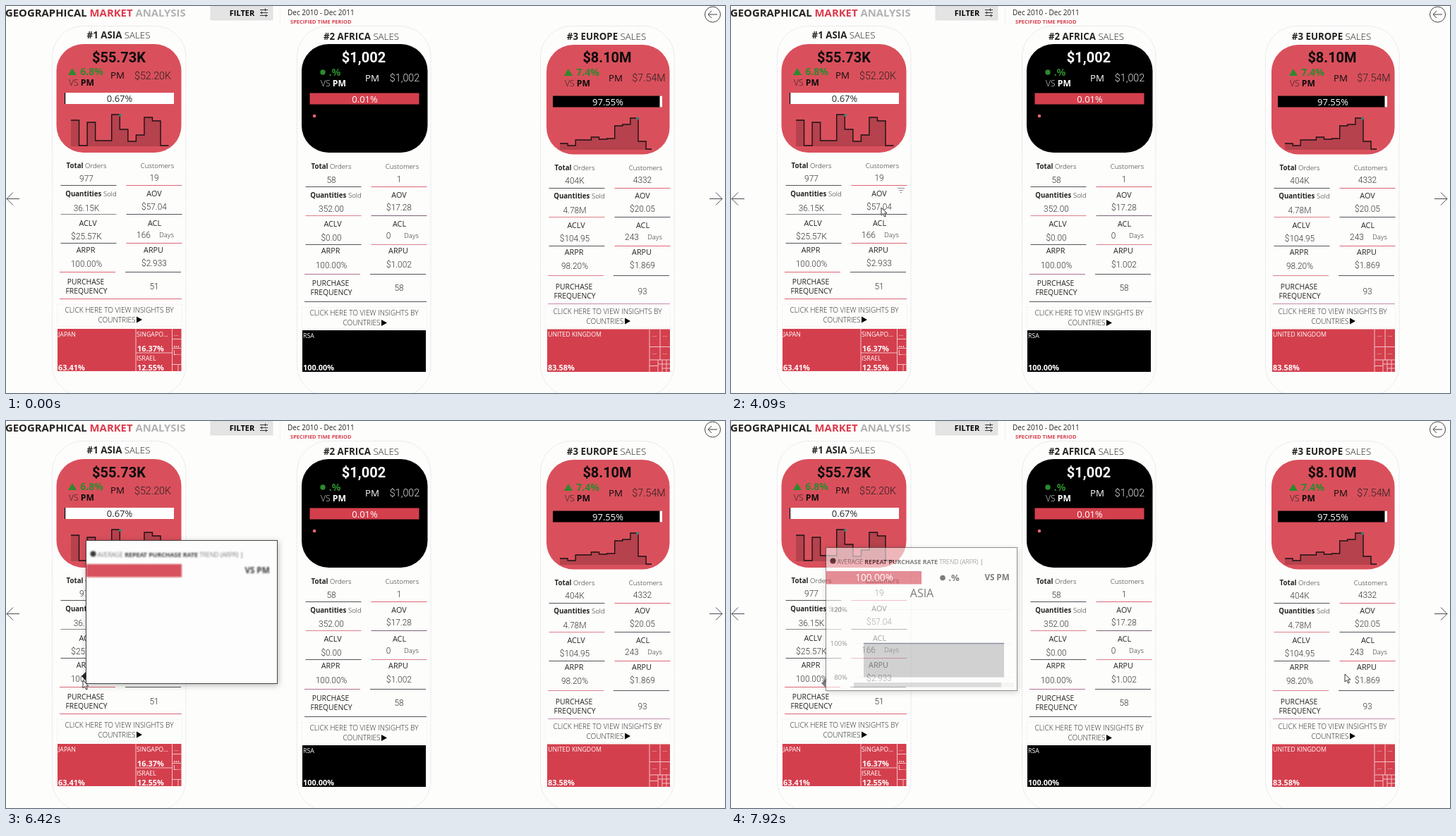
Animation of 1019x549 px, one loop 8000 ms. Source, as an HTML page:

```html
<!DOCTYPE html>
<html lang="en">
<head>
<meta charset="utf-8">
<title>Geographical market analysis</title>
<style>
html, body { margin: 0; height: 100%; overflow: hidden; background: #fdfdfc; }
svg { display: block; }
text { font-family: "Open Sans", "Noto Sans", sans-serif; white-space: pre; }
.num { font-family: Roboto, "Liberation Sans", sans-serif; }
.b { font-weight: 700; }
.l { font-weight: 300; }
</style>
</head>
<body>
<svg id="stage" width="1019" height="549" viewBox="0 0 1019 549"></svg>
<script>
const RED = '#d43f4d', CARD = '#d9505c', INK = '#252423', GREEN = '#2c8a2c';
const DARK = '#55555a', ROSE = '#dc6672', PINK = '#d9808a', PLUM = '#7a6274';

// SVG helpers; text is placed by the middle of its capitals
const text = (x, y, size, str, { fill = INK, cls = '', anchor = 'middle' } = {}) =>
  `<text x="${x}" y="${y}" dy=".36em" font-size="${size}" fill="${fill}" class="${cls}" text-anchor="${anchor}">${str}</text>`;
const num = (x, y, size, str, fill = INK, weight = 'l') => text(x, y, size, str, { fill, cls: 'num ' + weight });
const left = (x, y, size, str, fill = INK, cls = '') => text(x, y, size, str, { fill, cls, anchor: 'start' });
const bold = (s, fill) => `<tspan class="b"${fill ? ` fill="${fill}"` : ''}>${s}</tspan>`;
const light = s => `<tspan class="l">${s}</tspan>`;
const rect = (x, y, w, h, fill, extra = '') => `<rect x="${x}" y="${y}" width="${w}" height="${h}" fill="${fill}" ${extra}/>`;
const path = (d, stroke = INK, fill = 'none', width = 1) => `<path d="${d}" stroke="${stroke}" fill="${fill}" stroke-width="${width}"/>`;
const dot = (x, y, r, fill) => `<circle cx="${x}" cy="${y}" r="${r}" fill="${fill}"/>`;
const up = (x, y, fill) => path(`M${x - 6} ${y + 5}h12l-6 -10z`, 'none', fill);
const dotted = color => `stroke="${color}" stroke-dasharray="1.5 1.5"`;

// Step chart: one level per month
function steps(x, dx, levels, base) {
  const line = levels.map(y => `V${y}h${dx}`).join('');
  return path(`M${x} ${base}${line}V${base}z`, 'none', '#b5424d') +
    path(`M${x} ${levels[0]}${line}`, '#1c1214', 'none', 1.4);
}

function header() {
  return left(-1, 10, 14.9, bold('GEOGRAPHICAL ') + bold('MARKET ', '#dc3a4b') + bold('ANALYSIS', '#b2b2b2')) +
    rect(290, 0, 88, 20, '#e4e4e4', dotted('#d2d2d2')) + text(334.5, 10.5, 11, 'FILTER', { cls: 'b', fill: '#000' }) +
    path('M360 5.5h11M360 9.5h11M360 13.5h11M367.5 3.5v4M362.5 7.5v4M368.5 11.5v4', '#333') +
    left(399, 9.5, 10, 'Dec 2010 - Dec 2011') + left(403, 22, 7.5, 'SPECIFIED TIME PERIOD', RED, 'b') +
    path('M388.5 0V27', '#f1f1f1') +
    '<circle cx="1001.5" cy="12" r="11" fill="none" stroke="#444"/>' +
    path('M1008 12h-13m5 -5l-5 5l5 5', '#444') +
    path('M19 273.5H1m9 -9l-9 9l9 9M997 273.5h18m-9 -9l9 9l-9 9', '#4a4a55');
}

const cards = [
  { dx: 0, dy: 0, title: '#1 ASIA', tx: 159.5, ty: 41.5, sales: '$55.73K', prev: '$52.20K', growth: '6.8%', shift: 0,
    head: [71.5, 54, 177, 154], fill: CARD, ink: '#0c0c0c', soft: '#2b2022', bar: [83, 123, '#fff'], share: '0.67%', shareInk: INK,
    left: ['977', '36.15K', '$25.57K', '100.00%'], right: ['19', '$57.04', '166', '$2.933'], freq: '51', freqY: 398, click: 431,
    lines: [254.5, 295.5, 336.5, 377.5, 415.5], colors: [DARK, ROSE, '#888', DARK, DARK, ROSE, ROSE, DARK, ROSE] },
  { dx: 347, dy: 1.5, title: '#2 AFRICA', tx: 503.5, ty: 43, sales: '$1,002', prev: '$1,002', growth: '', shift: 10,
    head: [419, 54, 178.5, 154], fill: '#000', ink: '#fff', soft: '#ddd', bar: [430.5, 123.5, RED], share: '0.01%', shareInk: '#fff',
    left: ['58', '352.00', '$0.00', '100.00%'], right: ['1', '$17.28', '0', '$1.002'], freq: '58', freqY: 400, click: 435.5,
    lines: [256.5, 297.5, 338.5, 380.5, 419.5], colors: [DARK, ROSE, PINK, PLUM, DARK, PINK, '#b0708c', DARK, DARK] },
  { dx: 692, dy: 3, title: '#3 EUROPE', tx: 851, ty: 43, sales: '$8.10M', prev: '$7.54M', growth: '7.4%', shift: 11,
    head: [766, 55, 174.5, 155.5], fill: CARD, ink: '#0c0c0c', soft: '#2b2022', bar: [775, 127.5, '#000'], share: '97.55%', shareInk: '#fff',
    left: ['404K', '4.78M', '$104.95', '98.20%'], right: ['4332', '$20.05', '243', '$1.869'], freq: '93', freqY: 405, click: 433,
    lines: [258.5, 299.5, 340.5, 382.5, 422.5], colors: [DARK, ROSE, PINK, DARK, DARK, ROSE, PINK, DARK, '#c58cab'] },
];

function cardHead(c) {
  const [x, y, w, h] = c.head, [bx, by, bf] = c.bar, g = c.dx + c.shift, s = c.shift ? 1 : 0;
  return text(c.tx, c.ty, 13.3, bold(c.title) + light(' SALES')) +
    rect(x, y, w, h, c.fill, 'rx="38"') +
    num(c.dx + 160, 73, 20, c.sales, c.ink, 'b') +
    (c.growth ? up(g + 94, 93 + s, GREEN) + text(g + 121.5, 93 + s, 14, c.growth, { fill: GREEN, cls: 'b' })
              : dot(449, 94, 3.7, GREEN) + text(466, 94, 14, '.%', { fill: GREEN, cls: 'b' })) +
    text(g + 107, 109 + s, 12.2, light('VS ') + bold('PM', c.ink), { fill: c.soft }) +
    text(c.dx + 158 + 14 * s, 98 + 4 * s, 13.3, 'PM', { fill: c.ink }) +
    num(g + 208, 99 + 3 * s, 14.3, c.prev, c.soft) +
    rect(bx, by, 155, 16, bf) + text(bx + 78, by + 8.5, 13, c.share, { fill: c.shareInk });
}

function cardBody(c) {
  const at = (x, y) => [c.dx + x, c.dy + y];
  const value = (x, y, s) => num(...at(x, y), 11.9, s, '#333');
  const label = (x, y, s) => text(...at(x, y), 10.8, s);
  const small = (x, y, s) => text(...at(x, y), 9.7, s);
  const rowsL = [245, 286.5, 327, 366], rowsR = [244, 284.5, 324.5, 365];
  let out = rect(c.dx + 65.5, 28.5, 189.5, 525, 'none', `rx="44" ${dotted('#d9d9e2')}`) +
    small(114, 226.5, bold('Total') + light(' Orders')) + small(214.5, 226.5, light('Customers')) +
    small(120.5, 267, bold('Quantities') + light(' Sold')) + label(210, 266.5, 'AOV') +
    label(116, 308, 'ACLV') + label(210.5, 308, 'ACL') + label(113, 346, 'ARPR') + label(209, 346, 'ARPU') +
    small(227.5, 324.5, light('Days'));
  rowsL.forEach((y, i) => out += value(114, y, c.left[i]) + value(i === 2 ? 195 : 210, rowsR[i], c.right[i]));
  out += text(c.dx + 113, c.freqY - 7, 10.4, 'PURCHASE') + text(c.dx + 114, c.freqY + 6.5, 10.4, 'FREQUENCY') +
    num(c.dx + 210, c.freqY, 11.9, c.freq, '#333');
  c.lines.forEach((y, i) => {
    const x = c.dx + 77.5 - (i > 2 ? 1.5 : 0);
    out += i === 4 ? path(`M${x} ${y}h173`, c.colors[8])
      : path(`M${x} ${y}h79`, c.colors[2 * i]) + path(`M${x + 93} ${y}h79`, c.colors[2 * i + 1]);
  });
  const cy = c.click + 14;
  return out + rect(c.dx + 72.5, c.click - 8, 177, 31, 'none', dotted('#ececf0')) +
    text(c.dx + 160.5, c.click, 10.1, light('CLICK HERE TO VIEW INSIGHTS BY')) +
    text(c.dx + 157, cy, 10.1, light('COUNTRIES')) +
    path(`M${c.dx + 185} ${cy - 4.5}v9l8 -4.5z`, 'none', '#000');
}

function charts() {
  return rect(83, 123, 1.2, 16, '#000') + rect(926.5, 127.5, 3.5, 16, '#fff') +
    steps(92, 11.55, [162, 198, 165, 191, 191, 154, 175, 192, 183, 158, 163, 198], 199) + dot(162, 155, 2, '#3d8579') +
    steps(785, 11.1, [195, 198, 190, 190, 186, 189, 188, 170, 168, 159, 192, 203], 204) + dot(895, 159.5, 2, '#3d8579') +
    dot(917, 203, 1.8, '#ee5a68') + dot(437, 156, 2.3, '#ee6470');
}

function treemaps() {
  const name = (x, y, s) => left(x, y, 8.8, s, '#fff');
  const pct = (x, y, s) => left(x, y, 10.9, s, '#fff', 'b');
  const more = (x, y) => text(x, y, 8, '...', { fill: '#fff' });
  return rect(73, 458, 175.5, 60, RED) + path('M184 458v60M235.5 458v60M184 492h51.5M235.5 472.5h13M235.5 485.5h13M235.5 508.5h13M244 508.5v10', '#f1c3c8') +
    name(74, 465.5, 'JAPAN') + pct(74, 513.5, '63.41%') + name(185, 465.5, 'SINGAPO…') + pct(186, 486, '16.37%') +
    name(185, 499.5, 'ISRAEL') + pct(186, 513.5, '12.55%') +
    more(241, 465) + text(241.5, 480, 10, '...', { fill: '#fff', cls: 'b' }) + name(237, 492, 'L…') +
    rect(420, 460, 175, 59, '#000') + name(421, 467.5, 'RSA') + pct(421, 513.5, '100.00%') +
    rect(767, 458.5, 174, 60.5, RED) +
    path('M912 458.5v60.5M927 458.5v44M912 483.5h29M912 502h29M924 502v17M930 502v17M936 502v17M912 510.5h12M924 508h17M930 514h11', '#f1c3c8') +
    name(768, 466, 'UNITED KINGDOM') + pct(768, 513.5, '83.58%') + more(919, 466) + more(934, 466) + more(919, 491) + more(934, 491);
}

// Tooltip shell; parts in .late appear once loading ends
const tooltip = (id, arrowY, early, late) => `<g id="${id}">
  <g style="filter:drop-shadow(1px 2px 4px #0004)">${rect(0.5, 0.5, 271, 203, '#fdfdfd', 'stroke="#444"')}</g>
  ${path(`M0 ${arrowY - 6}v12l-6 -6z`, 'none', '#222')}
  <g class="early">${early}</g><g class="late">${late}</g></g>`;

const grid = (x, y, w) => `<path d="M${x} ${y}h${w}" ${dotted('#e4e4e4')}/>`;
const axis = (x, y, s) => text(x, y, 9.6, s, { fill: '#555', anchor: 'end' });

function aovTip() {
  const ys = [156, 151, 164, 149, 148, 100, 147, 157, 157, 155, 101, 137];
  const line = ys.map((y, i) => `${50 + i * 18.36} ${y}`).join('L');
  return tooltip('aov', 11,
    dot(10, 20, 4, RED) + left(16, 20, 13, light('AVERAGE ') + bold('ORDER VALUE') + light(' TREND') + ` (AOV) <tspan fill="${RED}">|</tspan>`) +
    rect(0.5, 35, 135, 21, '#000') + text(242, 46.5, 11.9, 'VS PM', { cls: 'b' }),
    num(68, 46.5, 14.6, '$57.04', '#fff', 'b') + up(158, 47, INK) + num(187, 47, 14.2, '5.8%', INK, 'b') + text(136, 68, 16, 'ASIA') +
    axis(28, 116, '$200') + axis(28, 163, '$0') + grid(36, 116, 230) + grid(36, 164, 230) +
    path(`M50 164L${line}V164z`, 'none', '#eec3c8') + path('M' + line, '#cf5a66', 'none', 1.2) +
    rect(36, 192, 230, 7, '#f0f0f0') + rect(36, 192, 212, 7, '#c4c4c4'));
}

function arprTip() {
  return tooltip('arpr', 193,
    dot(10.5, 19.5, 4, '#222') + left(16.5, 21, 8.8, light('AVERAGE ') + bold('REPEAT PURCHASE RATE') + light(' TREND (ARPR) ') + '|') +
    rect(0.5, 34, 135.5, 18.5, RED) + text(243, 42.5, 11.6, 'VS PM', { cls: 'b' }),
    text(69, 43.5, 13.6, '100.00%', { fill: '#fff' }) + dot(166, 43.5, 3.8, '#222') + text(182, 43, 13, '.%', { cls: 'b' }) + text(136.5, 65, 16, 'ASIA') +
    axis(31, 88.5, '120%') + axis(31, 136.5, '100%') + axis(31, 185, '80%') + grid(40, 88.5, 225) + grid(40, 136.5, 225) + grid(40, 184.5, 225) +
    rect(54, 136.5, 199, 48, '#b3b3b3') + path('M54 136.5h199', '#3c4763', 'none', 1.3) +
    rect(40, 192, 227, 6.5, '#f0f0f0') + rect(40, 192, 209, 6.5, '#c4c4c4'));
}

const stage = document.getElementById('stage');
stage.innerHTML = header() + cards.map(c => cardBody(c) + cardHead(c)).join('') + charts() + treemaps() +
  `<g id="filter">${path('M236 258.5h10M238 261.5h6M240 264.5h2', '#8a8a99')}</g>` +
  aovTip() + arprTip() +
  `<g id="cursor">${path('M0 0V11L2.6 8.6L4.6 13L6.4 12.2L4.5 7.9H8z', '#222', '#fff', 0.9)}</g>`;
const el = id => document.getElementById(id);

// Keyframes are [time, x, y]
const cursorPath = [[40, 420, 549], [790, 224, 293], [920, 224, 293], [1170, 217, 288], [3790, 217, 288], [4090, 213, 286],
  [4650, 213, 286], [4980, 102, 333], [5250, 102, 336], [6000, 105, 366], [6420, 109, 368], [6600, 122, 375],
  [6880, 475, 383], [7350, 850, 366], [7920, 870, 359], [8000, 870, 359]];
const aovPath = [[0, 226, 273], [8000, 226, 273]];
const arprPath = [[6420, 113, 169], [6880, 121, 177], [7060, 134, 179], [8000, 134, 179]];

function along(keys, t) {
  const i = Math.max(1, keys.findIndex(k => k[0] >= t));
  const [t0, x0, y0] = keys[i - 1], [t1, x1, y1] = keys[i];
  const k = Math.min(1, Math.max(0, (t - t0) / (t1 - t0))), e = k * k * (3 - 2 * k);
  return `translate(${x0 + (x1 - x0) * e} ${y0 + (y1 - y0) * e})`;
}

function show(id, visible) { el(id).style.display = visible ? '' : 'none'; }

function updateTip(id, keys, t, start, fadeStart, fadeEnd) {
  const tip = el(id), loading = t < start + 200;
  show(id, t >= start && t < fadeEnd);
  tip.setAttribute('transform', along(keys, t));
  tip.style.opacity = Math.min(1, (fadeEnd - t) / (fadeEnd - fadeStart));
  const early = tip.querySelector('.early');
  early.style.filter = loading ? 'blur(1.2px)' : '';
  early.style.opacity = loading ? 0.9 : 1;
  tip.querySelector('.late').style.display = loading ? 'none' : '';
}

function frame() {
  const t = performance.now() % 8000;
  show('cursor', t >= 40);
  el('cursor').setAttribute('transform', along(cursorPath, t));
  show('filter', t >= 3790 && t < 5250);
  updateTip('aov', aovPath, t, 4420, 5650, 6000);
  updateTip('arpr', arprPath, t, 6420, 7780, 8120);
  requestAnimationFrame(frame);
}
frame();
</script>
</body>
</html>
```
